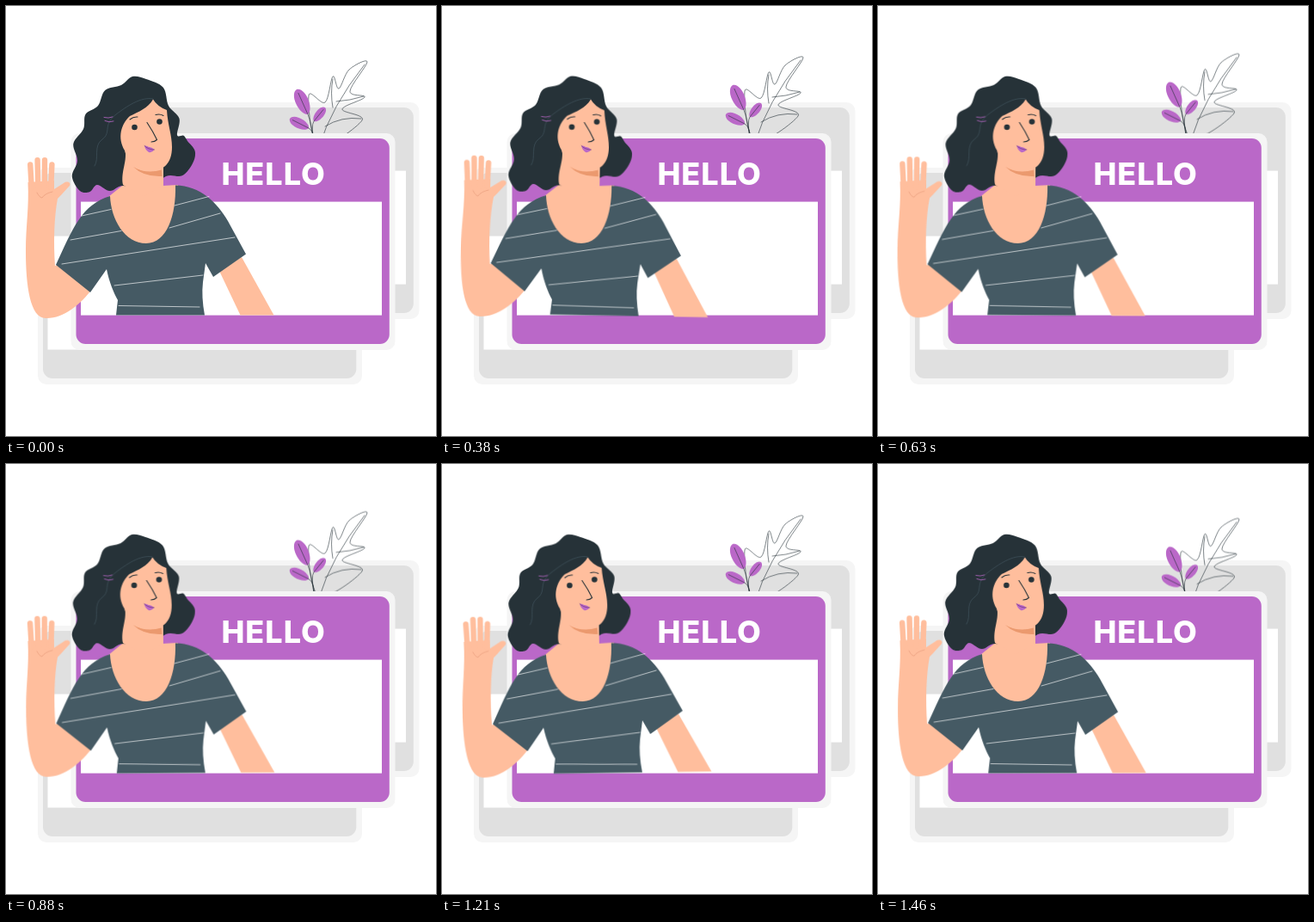
Recreate the animation shown at these times as an HTML page. Size 500x500 px, loop 1500 ms.

```html
<!DOCTYPE html>
<html lang="en">
<head>
<meta charset="utf-8">
<title>Hello</title>
<style>
  html, body { margin: 0; width: 100%; height: 100%; overflow: hidden; background: #fff; }
  svg { display: block; width: 100%; height: 100%; }
  #woman, #plant { transform-box: view-box; transform-origin: 167px 223px; }
  .line { fill: none; stroke: #263238; stroke-width: .6; stroke-linecap: round; }
  .skin { fill: #ffbe9d; }
  .hair { fill: #263238; }
  .shirt { fill: #455a64; }
  .accent { fill: #ba68c8; }
  .stripes { fill: none; stroke: #fff; stroke-width: .65; stroke-linecap: round; }
  #fingers { stroke: #ffbe9d; stroke-width: 6.4; stroke-linecap: round; }
</style>
</head>
<body>
<svg viewBox="0 0 500 500" xmlns="http://www.w3.org/2000/svg">
  <g id="back"></g>

  <g id="plant">
    <path id="oak" class="line"/>
    <path class="line" d="M364 164Q378 117 417 68M380 118Q377 101 380 85M384 111Q400 110 416 105M371 140Q390 128 413 131"/>
    <g id="sprigs"></g>
  </g>

  <g id="front"></g>
  <text x="311.1" y="207.7" text-anchor="middle" fill="#fff" font-family="Inter, 'Open Sans', sans-serif" font-weight="800" font-size="36" letter-spacing="1">HELLO</text>

  <g id="woman">
    <!-- waving arm -->
    <path class="skin" d="M25.500 205C27 235 23 255 23 285C23 325 28 363 46 363C66 364 86 348 101 328L80 295L57 302C55 275 56 245 60 224C66 218 70 213 74 209C76 205 71 203 67 206L56 213V203Z"/>
    <g id="fingers"></g>
    <path class="line" stroke-opacity=".7" style="stroke:#d98767" d="M36 217Q39 223 42 223Q45 218 54 216"/>

    <!-- lowered arm -->
    <path class="skin" d="M248 308L274 292L311.500 359.500H272.500Z"/>

    <path class="skin" d="M134 195L135 209L119 222Q125 278 163 279Q200 275 200 208L182 209V190Z"/>
    <path class="shirt" d="M121 221C88 231 78 258 58 301L98 333L117 306C120 321 125 333 130 342Q129 350 128 359.500H231Q227 338 229 321L232 299L241 315L279 288.500L258 250C246 229 226 209 197 208.500C198 243 187 276 163 276C138 276 122 248 121 221Z"/>
    <path class="stripes" d="M88 244L122 236.500M196 232L236 221.500M75 272L134 261.500M190 258L249 241M65 300L266 269M126 325L229 313M131 348.500L225 350"/>

    <path id="hair" class="hair"/>
    <path class="line" style="stroke:#455a64" d="M171 108C157 105 140 117 128 126C112 138 123 147 112 155C101 163 109 177 103 186"/>
    <path fill="none" stroke="#ba68c8" stroke-width=".8" stroke-linecap="round" d="M114 129.500Q119 131 124 129M115 133.500Q120 136 125 134"/>

    <!-- neck and face -->
    <path class="skin" d="M138 165C142 180 133 192 136 208L160 222L183 209V180Z"/>
    <path fill="#eb996e" d="M148 187Q163 196 181 190.500L181.500 198Q160 199 148 187Z"/>
    <path class="skin" d="M171 108.500Q176 117 187 121C188 138 193 150 193 164C193 183 183 192 167 192C150 192 142 183 138 168C129 153 134 137 144 128C154 123 165 119 171 108.500Z"/>
    <path class="line" style="stroke-width:1.100" d="M144 132Q148 128.500 153 129M174 126.500Q179 125 183 127.500M164 135.500Q171 146 175.500 155.500Q173 158 169 158"/>
    <g class="hair">
      <circle cx="149.500" cy="141" r="3.300"/>
      <circle cx="178.500" cy="134.500" r="3.300"/>
    </g>
    <path class="accent" d="M161 162.500Q164 162 166 164Q169 163.500 172.500 167Q170 171 166 170Q162 167.500 161 162.500Z"/>
    <path class="line" style="stroke:#5e3068" d="M161 162.500Q165 167 172.500 167"/>
  </g>
</svg>

<script>
  const $ = id => document.getElementById(id);
  const points = text => text.split(' ').map(p => p.split(',').map(Number));

  // Name badge: pale rim, coloured body, white writing field.
  function badge(x, y, color) {
    const box = (dx, dy, w, h, r, fill) =>
      `<rect x="${x + dx}" y="${y + dy}" width="${w}" height="${h}" rx="${r}" fill="${fill}"/>`;
    return box(0, 0, 377, 252, 10, '#f5f5f5')
      + box(6, 6, 364.3, 239, 11, color)
      + box(11.5, 79.6, 350, 132, 0, '#fff');
  }

  // Smooth closed curve through a few points.
  function curve(pts) {
    const at = i => pts[(i + pts.length) % pts.length];
    return pts.reduce((d, b, i) => {
      const a = at(i - 1), c = at(i + 1), e = at(i + 2);
      const c1 = b.map((v, k) => v + (c[k] - a[k]) / 6);
      const c2 = c.map((v, k) => v - (e[k] - b[k]) / 6);
      return d + `C${c1} ${c2} ${c}`;
    }, 'M' + pts[0]) + 'Z';
  }

  // Adds an outward bump halfway between neighbouring points.
  function wavy(pts, bulge) {
    return pts.flatMap(([x, y], i) => {
      const [u, v] = pts[(i + 1) % pts.length];
      return [[x, y], [(x + u) / 2 - (v - y) * bulge, (y + v) / 2 + (u - x) * bulge]];
    });
  }

  // Small leaf from base to tip, with a vein running on into its stem.
  function sprig([x, y], [tx, ty]) {
    const dx = tx - x, dy = ty - y;
    const at = (along, side) => [x + dx * along - dy * side, y + dy * along + dx * side];
    const leaf = `M${x} ${y}C${at(.1, .3)} ${at(.95, .33)} ${tx} ${ty}C${at(.95, -.33)} ${at(.1, -.3)} ${x} ${y}Z`;
    return `<path class="accent" d="${leaf}"/>`
      + `<path class="line" d="M${at(.85, 0)}L${x} ${y}Q${at(-.3, 0)} 359 164"/>`;
  }

  $('back').innerHTML = badge(103.5, 112, '#e0e0e0') + badge(37, 188, '#e0e0e0');
  $('front').innerHTML = badge(75.5, 148, '#ba68c8');

  $('oak').setAttribute('d', curve(points(
    '364,162 352,104 371,112 380,82 387,96 399,74 420,65 400,99 417,106 391,120 414,133')));
  $('hair').setAttribute('d', curve(wavy(points(
    '189,116 163,85 134,92 107,116 90,143 83,180 86,215 106,208 136,209 186,198 217,183 211,157 199,150'), .22)));
  $('sprigs').innerHTML = sprig([351, 126], [338, 97])
    + sprig([352, 142], [330, 131]) + sprig([358, 134], [371, 118]);

  // Fingers fan out from the palm, the middle ones longest.
  for (let i = 0; i < 4; i++) {
    const s = i - 1.5;
    $('fingers').innerHTML +=
      `<path d="M${41 + s * 7.5} 211L${40.8 + s * 8.4} ${178.5 + s * s * 2.6}"/>`;
  }

  // 24 poses per second
  const timing = { duration: 1500, iterations: Infinity, easing: 'steps(36, end)' };
  const play = (id, steps) =>
    $(id).animate(steps.map(([offset, transform]) => ({ offset, transform })), timing);

  play('woman', [[0, 'rotate(0deg)'], [.25, 'rotate(1deg)'], [.75, 'rotate(-1deg)'], [1, 'rotate(0deg)']]);
  play('plant', [[0, 'translateY(0px)'], [.5, 'translateY(-10px)'], [1, 'translateY(0px)']]);
</script>
</body>
</html>
```
